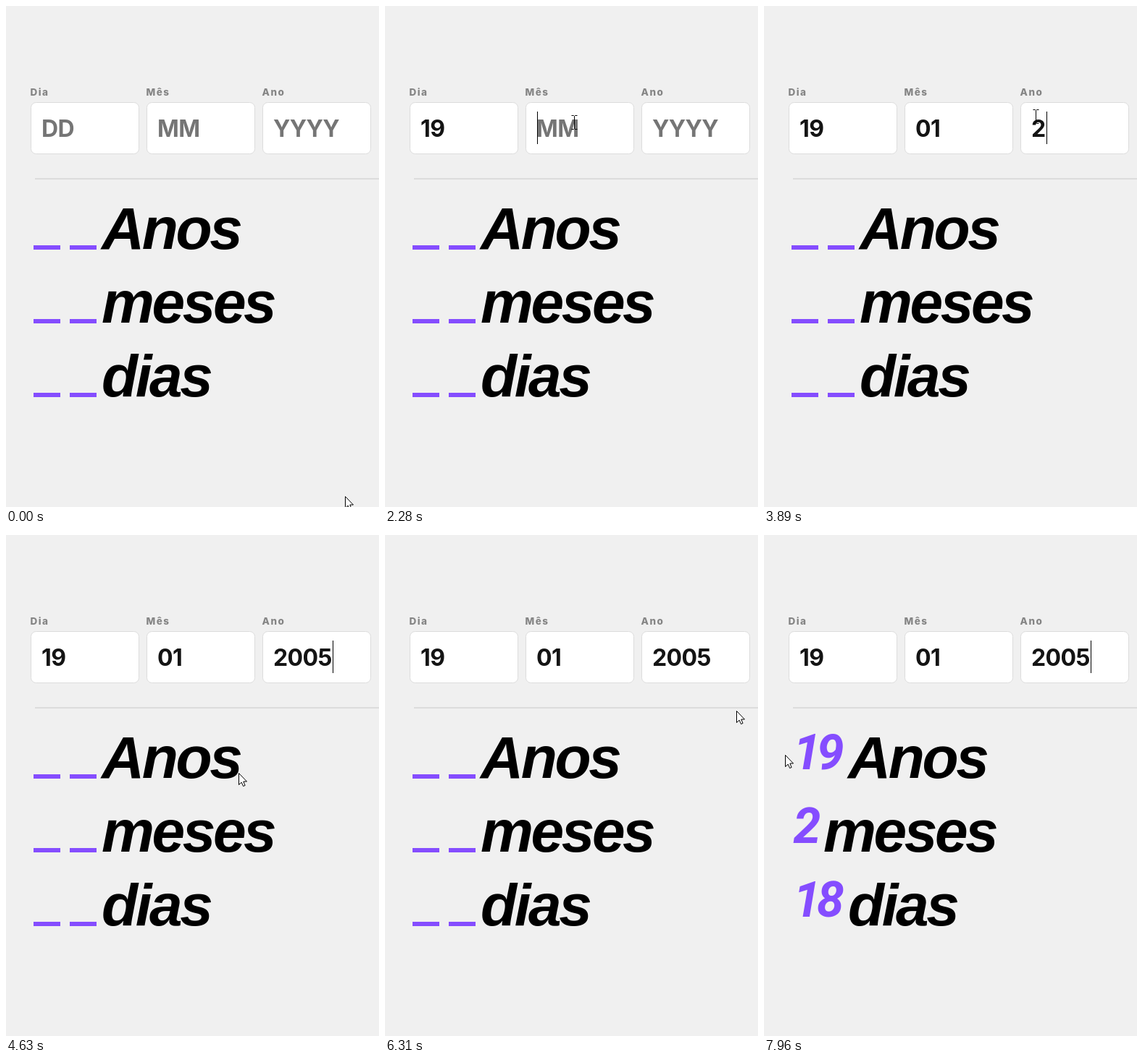
Animation, 515 px wide and 693 px high, one loop 8000 ms. Source, as an HTML page:

```html
<!DOCTYPE html>
<html lang="pt">
<head>
<meta charset="utf-8">
<title>Calculadora de idade</title>
<style>
  html, body { margin: 0; width: 100%; height: 100%; overflow: hidden; background: #f0f0f0; }
  svg { display: block; }
  text { white-space: pre; }
  .label { font: 800 13.5px Inter, sans-serif; letter-spacing: 1.5px; fill: #858585; }
  .box { fill: #fff; stroke: #dcdcdc; }
  .value { font: 700 32px Inter, sans-serif; letter-spacing: -.6px; fill: #141414; }
  .value.empty { fill: #757575; }
  .word { font: italic 700 82px "Liberation Sans", Arial, sans-serif; letter-spacing: -3.4px; }
  .count { font: italic 700 68px Roboto, sans-serif; letter-spacing: -5.5px; }
  .count, .dash { fill: #854dff; }
  .cursor { fill: none; stroke: #000; }
</style>
</head>
<body>
<svg width="515" height="693" viewBox="0 0 515 693">
  <g id="form"></g>
  <rect x="40" y="238" width="475" height="2" fill="#dcdcdc"/>
  <g id="results"></g>
  <rect id="caret" y="146" width="1" height="45"/>
  <path id="arrow" class="cursor" style="fill:#fff" d="M.5 .5V16.5L4.2 13.1 6.6 18.5 9.1 17.4 6.8 12H11.5Z"/>
  <path id="beam" class="cursor" d="M-3.5-9.5h3l1 1 1-1h3M.5-8.5v17M-3.5 9.5h3l1-1 1 1h3"/>
</svg>
<script>
const LOOP = 8000, FRAME = 1000 / 15, BLINK = 530, RESULT_AT = 6870;
const $ = id => document.getElementById(id);

// Each field is focused by a click, then receives one key per character
const fields = [
  { label: 'Dia', hint: 'DD', value: '19', click: 670, keys: [1530, 1600] },
  { label: 'Mês', hint: 'MM', value: '01', click: 2220, keys: [2820, 3020] },
  { label: 'Ano', hint: 'YYYY', value: '2005', click: 3490, keys: [3890, 3960, 4160, 4290] }
];
fields.forEach((f, i) => { f.x = 34 + 160 * i; });

const rows = [['Anos', '19'], ['meses', '2'], ['dias', '18']];

// Pointer glides, each starting where the last one ended
const glides = [
  { from: 70, to: 470, end: [94, 159] },
  { from: 1930, to: 2350, end: [265, 161] },
  { from: 2750, to: 2820, end: [272, 160] },
  { from: 3150, to: 3490, end: [375, 153] },
  { from: 4490, to: 5250, end: [345, 614], bend: [-45, 0] },
  { from: 5320, to: 5390, end: [470, 720] },
  { from: 5590, to: 6010, end: [560, 255], bend: [-170, 0] },
  { from: 6310, to: 6450, end: [410, 230] },
  { from: 7400, to: 7960, end: [29, 304], bend: [0, 25] }
];
const home = [468, 678];
glides.forEach((g, i) => { g.start = i ? glides[i - 1].end : home; });

$('form').innerHTML = fields.map(f => `
  <text class="label" x="${f.x - .5}" y="124">${f.label}</text>
  <rect class="box" x="${f.x + .5}" y="133.5" width="149" height="71" rx="7"/>
  <text class="value" x="${f.x + 15}" y="181"></text>`).join('');

$('results').innerHTML = rows.map(([word, count], i) => `
  <g transform="translate(0 ${i * 102})">
    <g class="pending">
      <rect class="dash" x="38" y="331" width="37" height="6"/>
      <rect class="dash" x="88" y="331" width="37" height="6"/>
      <text class="word" x="132" y="335.5">${word}</text>
    </g>
    <g class="done">
      <text class="count" x="40.5" y="324">${count}</text>
      <text class="word" x="${48 + 34 * count.length}" y="335.5">${word}</text>
    </g>
  </g>`).join('');

const values = document.querySelectorAll('.value');
const show = (el, on) => { el.style.display = on ? '' : 'none'; };
const showAll = (selector, on) => document.querySelectorAll(selector).forEach(el => show(el, on));

function pointerAt(t) {
  const g = glides.filter(g => g.from <= t).pop();
  if (!g) return home;
  const steps = Math.round((g.to - g.from) / FRAME) + 1;
  const step = Math.floor((t - g.from) / FRAME + .1) + 1;
  const p = Math.sin(Math.min(step / steps, 1) * Math.PI / 2);
  const bend = g.bend || [0, 0];
  return g.start.map((a, n) => Math.round(a + (g.end[n] - a) * p + bend[n] * 4 * p * (1 - p)));
}

function drawFields(t) {
  fields.forEach((f, i) => {
    const text = f.value.slice(0, f.keys.filter(k => k <= t).length);
    values[i].textContent = text || f.hint;
    values[i].classList.toggle('empty', !text);
  });
}

// The blink restarts at every click or key
function drawCaret(t) {
  const active = fields.findLastIndex(f => f.click <= t);
  if (active < 0) return show($('caret'), false);
  const f = fields[active], el = values[active];
  const typed = f.keys.filter(k => k <= t);
  const last = typed.length ? typed.at(-1) : f.click;
  const width = typed.length ? el.getComputedTextLength() : 0;
  show($('caret'), Math.floor((t - last) / BLINK) % 2 === 0);
  $('caret').setAttribute('x', Math.round(f.x + 16 + width));
}

function drawPointer(t) {
  const [x, y] = pointerAt(t);
  const overField = y > 133 && y < 205 && fields.some(f => x > f.x && x < f.x + 150);
  show($('beam'), overField);
  show($('arrow'), !overField);
  for (const id of ['arrow', 'beam']) $(id).setAttribute('transform', `translate(${x} ${y})`);
}

function draw(t) {
  drawFields(t);
  drawCaret(t);
  drawPointer(t);
  showAll('.pending', t < RESULT_AT);
  showAll('.done', t >= RESULT_AT);
}

const origin = performance.now();
function frame() {
  draw((performance.now() - origin) % LOOP);
  requestAnimationFrame(frame);
}
frame();
</script>
</body>
</html>
```
